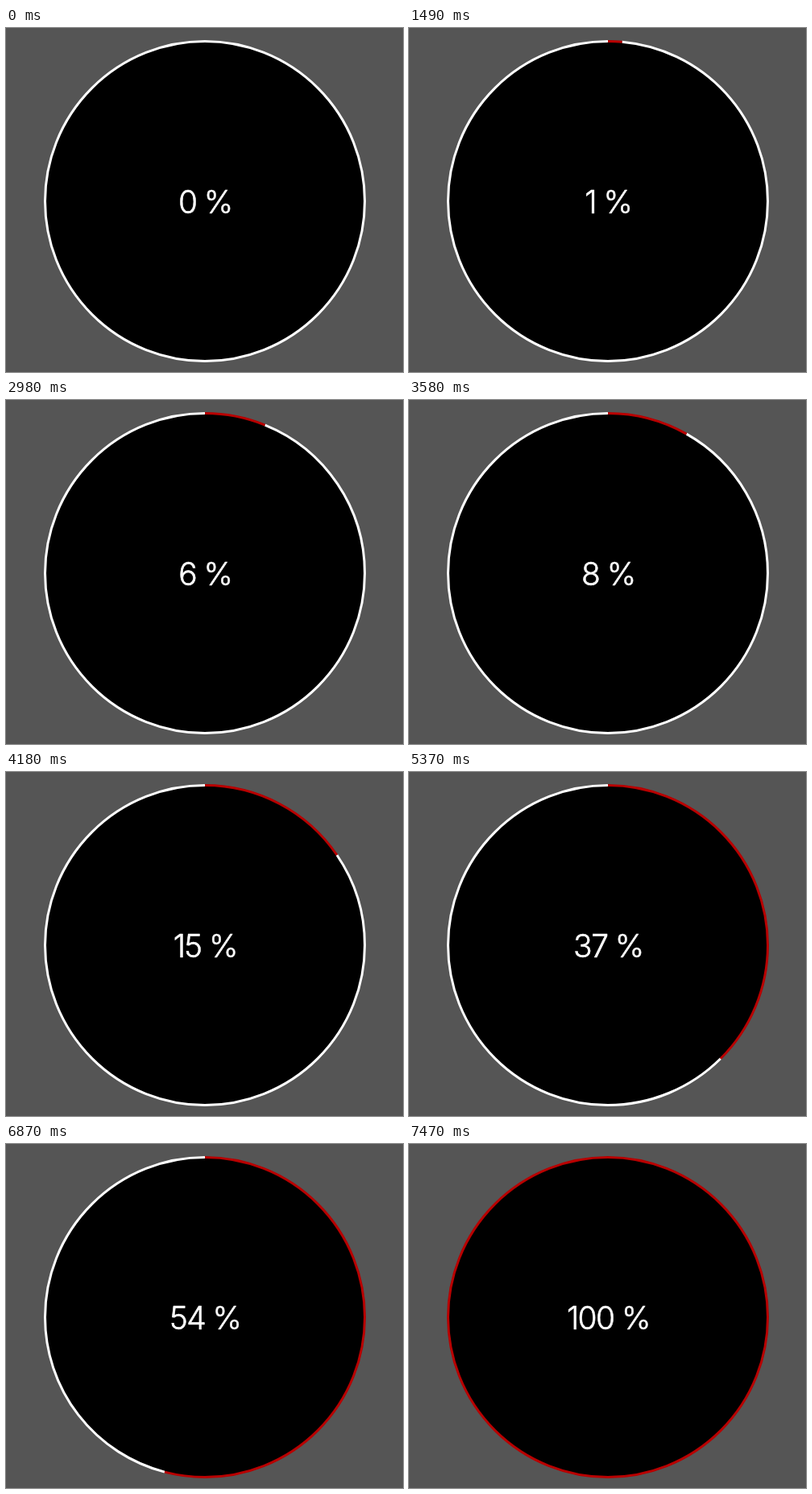
These frames come from a looping animation (493x427 px, 8.82 s). An HTML page:

```html
<!DOCTYPE html>
<html lang="en">
<head>
<meta charset="utf-8">
<title>Progress ring</title>
<style>
  html, body { margin: 0; width: 100%; height: 100%; overflow: hidden; background: #555; }
  svg { display: block; width: 493px; height: 427px; }
  .arc { fill: none; stroke-width: 3; }
  text {
    font: 300 39px Inter, "Open Sans", sans-serif;
    letter-spacing: -1.6px;
    text-anchor: middle;
    fill: #fff;
    stroke: #fff;
    stroke-width: .6;
    stroke-linejoin: round;
  }
</style>
</head>
<body>
<svg viewBox="0 0 493 427">
  <g transform="translate(247 215) rotate(-90)">
    <circle r="198.5"/>
    <circle class="arc" id="rest" r="198.5" pathLength="100" stroke="#fff"/>
    <circle class="arc" id="done" r="198.5" pathLength="100" stroke="#b80000"/>
  </g>
  <text id="label" x="247.4" y="230"></text>
</svg>
<script>
const LOOP = 8820, START = 1482, STEP = 149.5;

// Linear moves, with times counted in steps
const moves = [
  { from: -1, until: 6, to: 9.9 },
  { from: 7, until: 11.7, to: 4 },
  { from: 11.7, until: 18, to: 15.46 },
  { from: 19, until: 26, to: 37.55 },
  { from: 27, until: 32, to: 19.6 },
  { from: 33, until: 40, to: 100 }
];

const [rest, done, label] = ['rest', 'done', 'label'].map(id => document.getElementById(id));

const clamp01 = x => Math.min(1, Math.max(0, x));

function percentAt(time) {
  const step = Math.max(-1, Math.floor((time - START) / STEP));
  return moves.reduce((value, { from, until, to }) =>
    value + (to - value) * clamp01((step - from) / (until - from)), 0);
}

function draw(time) {
  const percent = percentAt(time);
  done.setAttribute('stroke-dasharray', `${percent} 100`);
  rest.setAttribute('stroke-dasharray', `0 ${percent} ${100 - percent} 0`);
  label.textContent = `${Math.floor(percent)} %`;
}

const begin = performance.now();
function tick() {
  draw((performance.now() - begin) % LOOP);
  requestAnimationFrame(tick);
}
tick();
</script>
</body>
</html>
```
